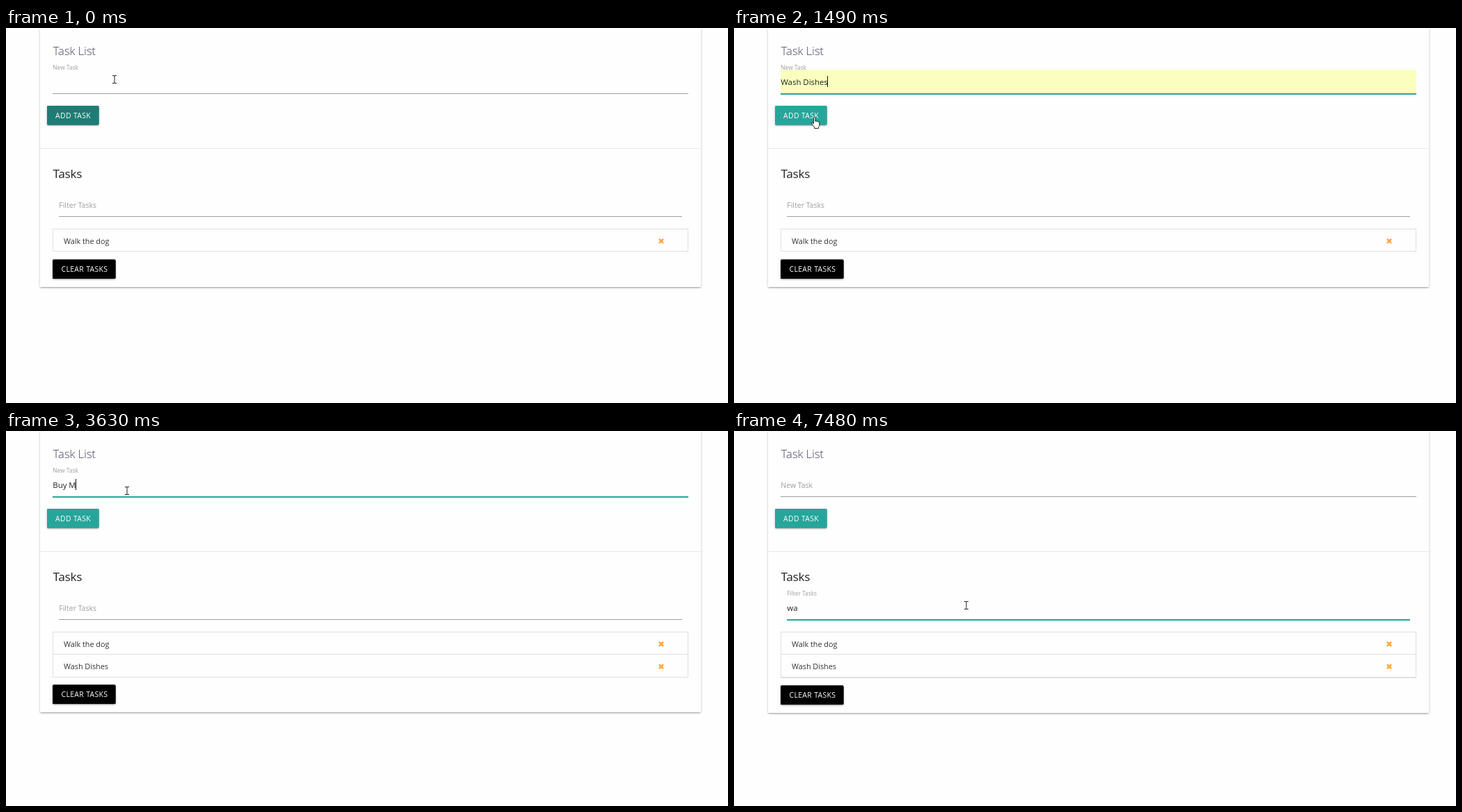
Write an HTML page with a canvas that moves like this. It is 1038 px wide and 540 px high and loops after 8 s.

```html
<!DOCTYPE html>
<html lang="en">
<head>
<meta charset="utf-8">
<title>Task List</title>
<style>
  html, body { margin: 0; width: 100%; height: 100%; overflow: hidden; background: #fefefe; }
  canvas { display: block; }
</style>
</head>
<body>
<canvas id="stage" width="1038" height="540"></canvas>
<script>
const ctx = document.getElementById('stage').getContext('2d');
const LOOP = 8000, ROW = 32.4;
const PAPER = '#fefefe', BORDER = '#e0e0e0', GREY = [158, 158, 158], TEAL = [38, 166, 154];
const TASKS = ['Walk the dog', 'Wash Dishes', 'Buy Milk'];
const SUGGESTIONS = ['Walk the dog', '2'.repeat(28) + '33', 'Wash Dishes'];

const ARROW = new Path2D('M.5.5V11.7L3.1 9.3 4.9 13.4 6.7 12.6 5 8.7H8.4Z');
const HAND = new Path2D('M4 10.5V2.2a1.2 1.2 0 0 1 2.4 0V7a1.1 1.1 0 0 1 2.1.3a1.1 1.1 0 0 1 2.1.5' +
  'a1 1 0 0 1 1.7.6V12q0 2-1.2 3v2H5.2v-1.6Q3 13 1 9.8q-.4-1.2.6-1.4Q3 8.6 4 10.5Z');
const BEAM = new Path2D('M-3 -5.5H-1L0 -5 1 -5.5H3M0 -5V5M-3 5.5H-1L0 5 1 5.5H3');

// Each step changes part of the state from its time (ms) on.
const STEPS = [
  [0, { pointer: ['beam', 156, 74], button: '#1d7d74', tasks: 1, text: '', caret: '', menu: false, hover: -1,
        autofill: false, focus: 0, lift: 1, query: '', queryFocus: 0, queryLift: 0 }],
  [280, { menu: true, caret: 'new', focus: .5, button: '#22928a' }],
  [430, { pointer: ['beam', 151, 85], focus: 1, button: '#26a69a' }],
  [580, { pointer: ['arrow', 144, 108], hover: 0, autofill: true }],
  [700, { pointer: ['arrow', 136, 131], hover: 1 }],
  [850, { pointer: ['arrow', 133, 134], hover: 2 }],
  [970, { pointer: ['arrow', 131, 136] }],
  [1090, { menu: false, hover: -1, text: 'Wash Dishes' }],
  [1210, { pointer: ['arrow', 128, 140] }],
  [1360, { pointer: ['arrow', 121, 134] }],
  [1490, { pointer: ['hand', 110.5, 127.5] }],
  [1760, { pointer: ['hand', 111, 127], button: '#2bbbad', tasks: 2, text: '', caret: '', autofill: false, focus: .6 }],
  [1910, { button: '#1d7d74', focus: 0 }],
  [2060, { pointer: ['arrow', 146, 108] }],
  [2180, { pointer: ['beam', 174, 86], menu: true, caret: 'new', focus: .5, button: '#22928a' }],
  [2300, { focus: 1, button: '#26a69a' }],
  [2670, { caret: '' }],
  [2920, { caret: 'new', text: 'B', menu: false }],
  [3230, { text: 'Bu' }],
  [3350, { text: 'Buy' }],
  [3630, { text: 'Buy M' }],
  [3750, { text: 'Buy Mi' }],
  [4000, { text: 'Buy Milk' }],
  [4120, { text: '', tasks: 3 }],
  [4650, { caret: '' }],
  [4900, { pointer: ['beam', 177, 78] }],
  [5180, { pointer: ['arrow', 269, 115], caret: 'new' }],
  [5310, { pointer: ['arrow', 331, 177] }],
  [5460, { pointer: ['arrow', 331, 219] }],
  [5610, { pointer: ['beam', 334, 251] }],
  [5730, { caret: '' }],
  [5980, { caret: 'query', focus: .8, lift: .45, queryFocus: .8, queryLift: .48 }],
  [6130, { focus: 0, lift: 0, queryFocus: 1, queryLift: 1 }],
  [6500, { caret: '' }],
  [6960, { caret: 'query', query: 'w' }],
  [7080, { query: 'wa' }],
  [7480, { caret: '' }]
];

const stateAt = t => Object.assign({}, ...STEPS.filter(s => s[0] <= t).map(s => s[1]));
const lerp = (a, b, k) => a + (b - a) * k;

function rect(x, y, w, h, color) {
  ctx.fillStyle = color;
  ctx.fillRect(x, y, w, h);
}

function frame(x, y, w, h, color) {
  ctx.strokeStyle = color;
  ctx.lineWidth = 1;
  ctx.strokeRect(x + .5, y + .5, w - 1, h - 1);
}

function write(str, x, y, size, color, weight = 400, spacing = 0) {
  ctx.font = `${weight} ${size}px "Open Sans", "Noto Sans", sans-serif`;
  ctx.letterSpacing = spacing + 'px';
  ctx.fillStyle = color;
  ctx.fillText(str, x, y);
  return ctx.measureText(str).width;
}

// A rounded box with the three-layer shadow of a raised surface.
function raised(x, y, w, h, color) {
  for (const [inset, dy, blur, alpha] of [[1.5, 2.25, .75, .12], [0, .75, 3.75, .2], [0, 1.5, 1.5, .14]]) {
    ctx.save();
    ctx.shadowColor = `rgba(0,0,0,${alpha})`;
    ctx.shadowOffsetY = dy;
    ctx.shadowBlur = blur;
    ctx.fillStyle = color;
    ctx.beginPath();
    ctx.roundRect(x + inset, y + inset, w - 2 * inset, h - 2 * inset, 1.5);
    ctx.fill();
    ctx.restore();
  }
}

function field(x, y, w, label, text, focus, lift, caret) {
  const mixed = GREY.map((g, i) => Math.round(lerp(g, TEAL[i], focus)));
  rect(x, y, w, focus === 1 ? 2 : 1, `rgb(${mixed})`);
  write(label, x + .3, y + lerp(-12, -33.7, lift), lerp(10.5, 8.4, lift), '#9e9e9e');
  const width = write(text, x + .3, y - 12, 11.4, '#222');
  if (caret) rect(x + Math.round(width), y - 25, 1, 16, '#111');
}

function menu(hover) {
  rect(67, 95, 915, 56, '#fff');
  if (hover >= 0) rect(68, 96 + hover * 18, 913, 18, '#bfdcf5');
  frame(67, 95, 915, 56, '#1c2b2b');
  SUGGESTIONS.forEach((s, i) => write(s, 74, 108.2 + i * 18.1, 8.75, '#111', 700));
}

function list(tasks, extra) {
  const height = Math.round(tasks * ROW) + 1 + extra;
  frame(67, 289, 914, height, BORDER);
  for (let i = 0; i < tasks; i++) {
    const y = 289 + i * ROW;
    if (i < tasks - 1 || extra) rect(68, Math.round(y + ROW), 912, 1, BORDER);
    write(TASKS[i], 83, Math.round(y + 21.6), 10.8, '#333');
    const cy = y + 17.8;
    ctx.strokeStyle = '#ffa63d';
    ctx.lineWidth = 2.6;
    ctx.beginPath();
    ctx.moveTo(939, cy - 3); ctx.lineTo(945, cy + 3);
    ctx.moveTo(945, cy - 3); ctx.lineTo(939, cy + 3);
    ctx.stroke();
  }
}

function drawPointer([kind, x, y]) {
  ctx.save();
  ctx.translate(x, y);
  ctx.strokeStyle = '#222';
  ctx.lineWidth = 1;
  if (kind === 'beam') {
    ctx.stroke(BEAM);
  } else {
    const shape = kind === 'hand' ? HAND : ARROW;
    ctx.fillStyle = '#fff';
    ctx.fill(shape);
    ctx.stroke(shape);
  }
  ctx.restore();
}

function draw(t) {
  const s = stateAt(t);
  const extra = s.query ? 1 : 0;
  const tasks = s.query ? 2 : s.tasks;
  const shift = Math.round((tasks - 1) * ROW) + extra;

  rect(0, 0, 1038, 540, PAPER);
  raised(49, -20, 950, 393 + shift, PAPER);
  rect(0, 0, 1038, 2, PAPER);
  rect(49, 173, 950, 1, '#e9e9e9');

  write('Task List', 67.5, 39, 17.2, '#4a4560', 300, -.3);
  if (s.autofill) rect(67, 60, 914, 34, '#faffbd');
  const entry = s.hover >= 0 ? SUGGESTIONS[s.hover] : s.text;
  field(67, 94, 914, 'New Task', entry, s.focus, s.lift, false);
  if (s.caret === 'new') {
    const offset = s.hover >= 0 ? 0 : Math.round(ctx.measureText(s.text).width);
    rect(67 + offset, 69, 1, 16, '#111');
  }
  raised(59, 112, 74.5, 27.5, s.button);
  write('ADD TASK', 71, 130, 10.4, '#fff', 400, .375);

  write('Tasks', 67.5, 216, 17.2, '#222', 400, -.3);
  field(76, 271, 896, 'Filter Tasks', s.query, s.queryFocus, s.queryLift, s.caret === 'query');
  list(tasks, extra);
  raised(67, 333.5 + shift, 90.5, 27.5, '#000');
  write('CLEAR TASKS', 79.5, 351 + shift, 10.4, '#fff', 400, .375);

  if (s.menu) menu(s.hover);
  drawPointer(s.pointer);
}

function tick() {
  draw(performance.now() % LOOP);
  requestAnimationFrame(tick);
}
tick();
</script>
</body>
</html>
```
